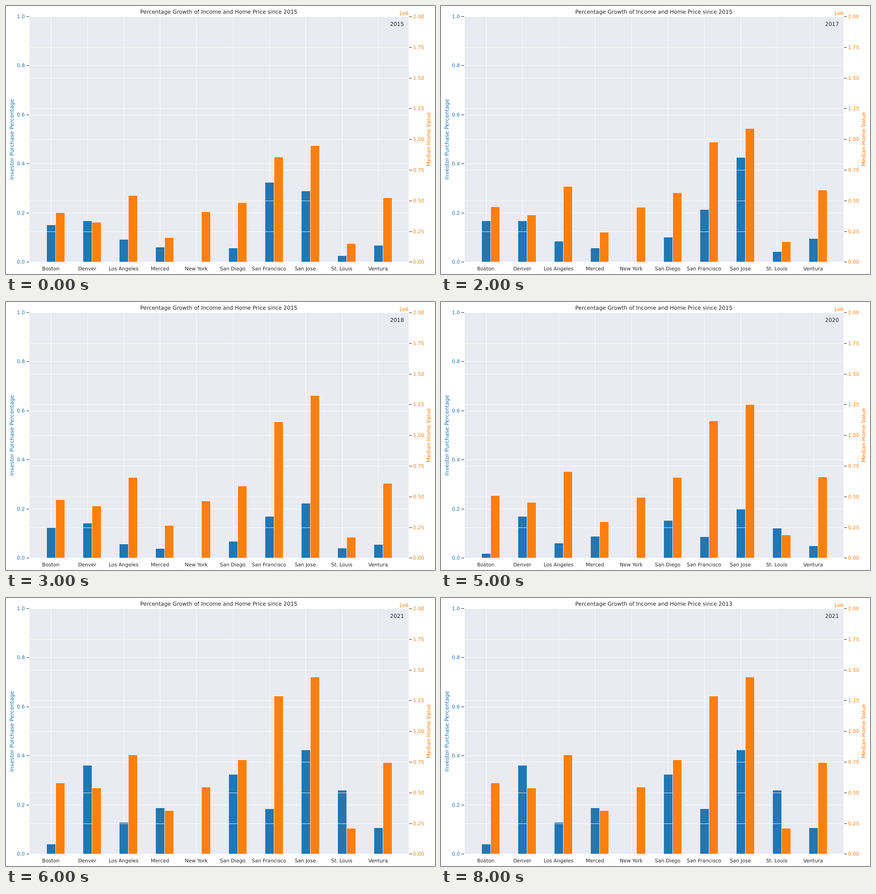
Write an HTML page that moves like this. It is 945 by 592 pixels and loops after 9 s.

```html
<!DOCTYPE html>
<html lang="en">
<head>
<meta charset="utf-8">
<title>Income and home price</title>
<style>
  html, body { margin: 0; width: 100%; height: 100%; overflow: hidden; background: #fff; }
  svg { display: block; font: 11px "DejaVu Sans", sans-serif; text-rendering: geometricPrecision; }
  .big { font-size: 12px; }
  .end { text-anchor: end; }
  .mid { text-anchor: middle; }
</style>
</head>
<body>
<svg id="chart" width="945" height="592" viewBox="0 0 945 592"></svg>
<script>
const DARK = '#262626', BLUE = '#1f77b4', ORANGE = '#ff7f0e';
const LEFT = 51, RIGHT = 887, TOP = 23, BASE = 565, PITCH = 80.096;

// Bar heights in key years: home value 2015, 2018, 2021; investor share 2015, 2017, 2018, 2021
const cities = [
  ['Boston', [109, 129, 157], [82, 91, 68, 22]],
  ['Denver', [88, 115, 146], [91, 91, 77, 196]],
  ['Los Angeles', [147, 178, 219], [50, 46, 31, 70]],
  ['Merced', [54, 72, 96], [33, 31, 21, 102]],
  ['New York', [111, 126, 148], [0, 0, 0, 0]],
  ['San Diego', [131, 159, 208], [31, 55, 37, 176]],
  ['San Francisco', [232, 301, 349], [176, 116, 92, 100]],
  ['San Jose', [257, 359, 391], [157, 231, 121, 230]],
  ['St. Louis', [41, 46, 57], [14, 23, 22, 141]],
  ['Ventura', [142, 165, 202], [37, 52, 30, 58]]
];

const mix = (a, b, t) => a + (b - a) * t;

// Rebuild 2015 to 2021 from 2015, 2017, 2018, 2020 and 2021
const fillYears = (a, c, d, f, g) => [a, mix(a, c, 0.5), c, d, mix(d, f, 0.5), f, g];
const homeYears = ([first, middle, last]) =>
  fillYears(first, mix(first, last, 0.28), middle, mix(first, last, 0.61), last);
// Investors bought about half as much in 2020 as in 2021
const investorYears = ([a, c, d, g]) => fillYears(a, c, d, 0.47 * g, g);

const home = cities.map(c => homeYears(c[1]));
const investor = cities.map(c => investorYears(c[2]));

const range = n => [...Array(n).keys()];
const rowAt = share => Math.round(565.4 - 542.5 * share) + 0.5;
const columnAt = (i, start) => Math.round(start + PITCH * i) + 0.5;
const line = (x1, y1, x2, y2, color = '#fff', width = 0.85) =>
  `<path d="M${x1} ${y1}L${x2} ${y2}" stroke="${color}" stroke-width="${width}"/>`;
const text = (x, y, str, color = DARK, cls = '', more = '') =>
  `<text x="${x}" y="${y}" fill="${color}" class="${cls}" ${more}>${str}</text>`;
const sideways = (x, y, str, color) =>
  text(x, y, str, color, 'big mid', `transform="rotate(-90 ${x} ${y})"`);
const gridRows = n => range(n + 1).map(i => line(LEFT, rowAt(i / n), RIGHT, rowAt(i / n))).join('');
const bars = (heights, year, start, color) => heights.map((years, i) => {
  const h = Math.round(years[year - 2015]);
  return `<rect x="${columnAt(i, start)}" y="${BASE - h + 0.5}" width="20" height="${h}"
    fill="${color}" stroke="#fff" stroke-width="0.85"/>`;
}).join('');

const back = `<rect x="${LEFT}" y="${TOP}" width="${RIGHT - LEFT}" height="${BASE - TOP}" fill="#eaeaf2"/>`
  + cities.map((_, i) => line(columnAt(i, 99.1), TOP, columnAt(i, 99.1), BASE)).join('')
  + gridRows(5);

const frame = '<path d="M51.5 23.5H887.5V565.5H51.5Z" fill="none" stroke="#fff"/>'
  + range(6).map(i => {
    const y = rowAt(i / 5);
    return line(45, y, 51, y, DARK, 1) + text(41.5, y + 3.5, (i / 5).toFixed(1), BLUE, 'end');
  }).join('')
  + range(9).map(i => {
    const y = rowAt(i / 8);
    return line(888, y, 894, y, DARK, 1) + text(896.8, y + 3.5, (i / 4).toFixed(2), ORANGE);
  }).join('')
  + cities.map(([name], i) => text(98.8 + PITCH * i, 584, name, DARK, 'mid')).join('')
  + text(886.5, 20, '1e6', ORANGE, 'end')
  + sideways(17, 294.5, 'Investor Purchase Percentage', BLUE)
  + sideways(935, 294.5, 'Median Home Value', ORANGE);

const chart = document.getElementById('chart');
let shown = -1;
function draw() {
  const step = Math.floor(performance.now() / 1000) % 9;
  if (step !== shown) {
    shown = step;
    // The last two years are shown again under a title with an earlier start
    const repeat = step > 6;
    const year = 2015 + step - (repeat ? 2 : 0);
    const since = repeat ? 2013 : 2015;
    chart.innerHTML = back + bars(investor, year, 89.15, BLUE) + gridRows(8)
      + bars(home, year, 109.15, ORANGE) + frame
      + text(468.8, 17, `Percentage Growth of Income and Home Price since ${since}`, DARK, 'big mid')
      + text(876.6, 44, year, DARK, 'big end');
  }
  requestAnimationFrame(draw);
}
draw();
</script>
</body>
</html>
```
